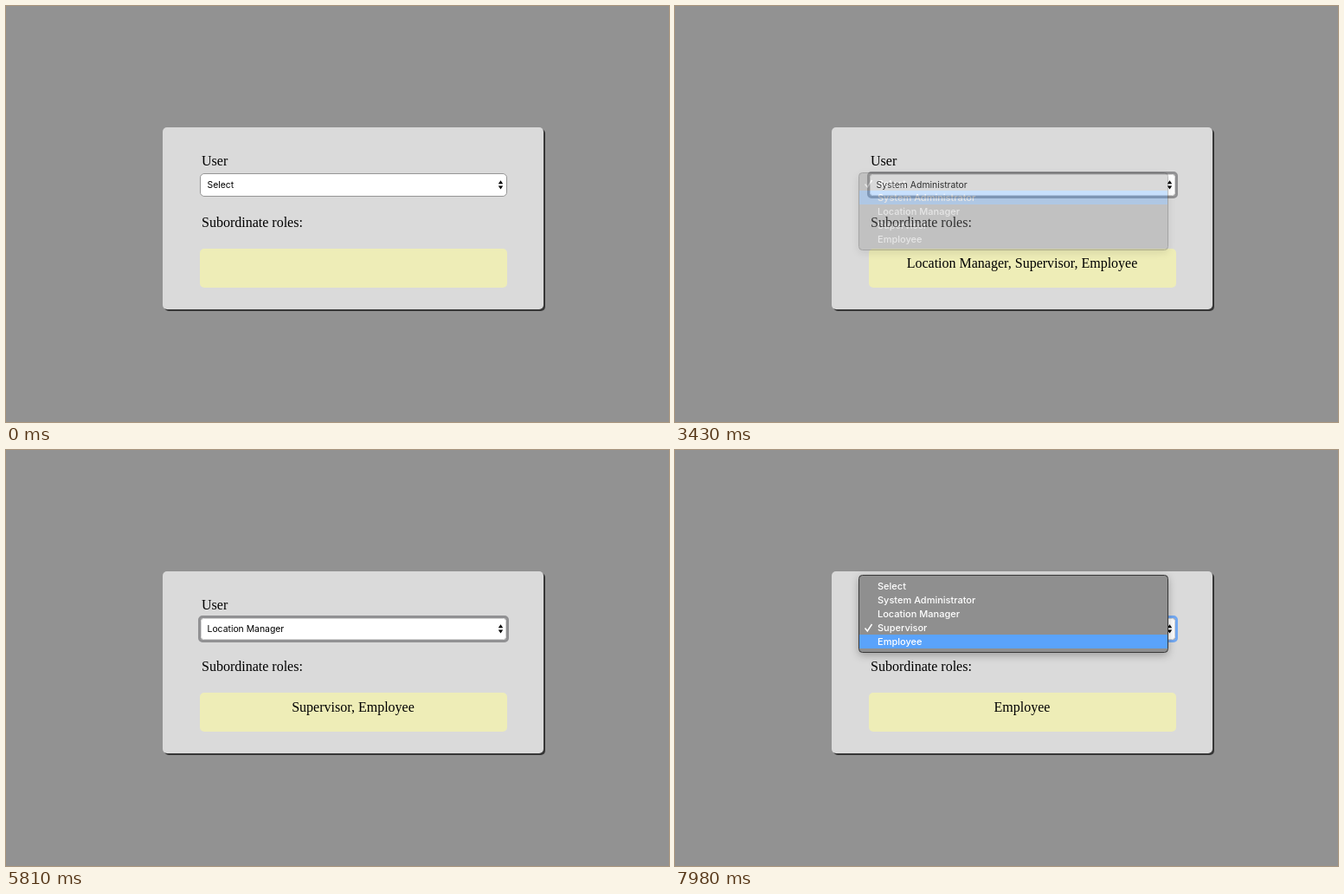
Write an HTML page that moves like this. It is 766 by 480 pixels and loops after 8000 ms.

```html
<!DOCTYPE html>
<html lang="en">
<head>
<meta charset="utf-8">
<style>
  html, body { margin: 0; width: 100%; height: 100%; overflow: hidden; background: #929292; }
  svg { display: block; width: 766px; height: 480px; }
  text { font: 16px "Liberation Serif", serif; white-space: pre; }
  #value { font: 10.4px Inter, sans-serif; }
  #menu text { font: 500 11px Inter, sans-serif; fill: #fff; }
  #menu { filter: drop-shadow(0 3px 5px rgba(0, 0, 0, .28)); }
</style>
</head>
<body>
<svg viewBox="0 0 766 480">
  <rect x="183" y="142" width="440" height="210" rx="5" fill="#363636"/>
  <rect id="panel" x="181" y="140" width="440" height="210" rx="5"/>
  <text x="226" y="184">User</text>
  <text x="226" y="255">Subordinate roles:</text>
  <rect x="224" y="280" width="355" height="45" rx="5" fill="#eeedb7"/>
  <text id="result" x="401" y="302" text-anchor="middle"></text>

  <rect x="224.5" y="193.5" width="354" height="26" rx="4.5" fill="#fff" stroke="#969696"/>
  <g id="ring" fill="none">
    <rect x="225.5" y="194.5" width="352" height="24" rx="3" stroke="#d4d4d4"/>
    <rect id="glow" x="223.5" y="192.5" width="356" height="28" rx="3.5" stroke-width="3"/>
  </g>
  <text id="value" x="232.5" y="210"></text>
  <path d="M568.8 205.2L571.5 201.2L574.2 205.2zM568.8 207.6L571.5 211.6L574.2 207.6z"/>

  <g id="menu">
    <rect x="212.5" y=".5" width="357" height="89" rx="4" fill="#8f8f8f" stroke="#383838"/>
    <rect id="bar" x="213" width="356" height="16" fill="#5aa3fb"/>
    <path id="check" d="M219.5 13.5L222.3 17L227.5 9" fill="none" stroke="#fff" stroke-width="1.5"/>
  </g>
</svg>
<script>
const LOOP = 8000, ROW = 16, BLINK = 70, FADE = 210;
const roles = ['Select', 'System Administrator', 'Location Manager', 'Supervisor', 'Employee'];
// Each visit to the menu picks the role after the current one.
const visits = [
  { open: 2240, move: 2560, close: 3150 },
  { open: 4340, move: 4760, close: 5250 },
  { open: 6230, move: 6650, close: 7210 },
  { open: 7630, move: 7900, close: Infinity }
];
const $ = id => document.getElementById(id);
const set = (id, attrs) => {
  for (const name in attrs) $(id).setAttribute(name, attrs[name]);
};

roles.forEach((role, i) => {
  const label = document.createElementNS('http://www.w3.org/2000/svg', 'text');
  label.textContent = role;
  label.setAttribute('x', 234);
  label.setAttribute('y', 17 + i * ROW);
  $('menu').append(label);
});

function draw(t) {
  const focused = t >= 1680;
  const picked = visits.filter(v => t >= v.close + 2 * BLINK).length;
  const index = visits.findLastIndex(v => t >= v.open);
  const visit = visits[index];
  const since = visit ? t - visit.close : Infinity;
  const opacity = Math.min(1, Math.max(0, 1 - (since - 2 * BLINK) / FADE));
  const active = since < 2 * BLINK;

  set('panel', { fill: focused && t < 2240 ? '#d9dadc' : '#dadada' });
  set('ring', { opacity: focused ? 1 : 0 });
  set('glow', { stroke: active ? '#73a9f2' : '#919193' });
  $('value').textContent = roles[picked];
  $('result').textContent = picked ? roles.slice(picked + 1).join(', ') : '';

  set('menu', { opacity, visibility: opacity ? 'visible' : 'hidden' });
  if (!opacity) return;
  const row = t < visit.move ? index : index + 1;
  set('menu', { transform: `translate(0 ${192 - index * ROW})` });
  set('check', { transform: `translate(0 ${index * ROW})` });
  set('bar', { y: 5 + row * ROW, opacity: since >= 0 && since < BLINK ? 0 : 1 });
}

const start = performance.now();
function tick(now) {
  draw(Math.max(0, now - start) % LOOP);
  requestAnimationFrame(tick);
}
draw(0);
requestAnimationFrame(tick);
</script>
</body>
</html>
```
